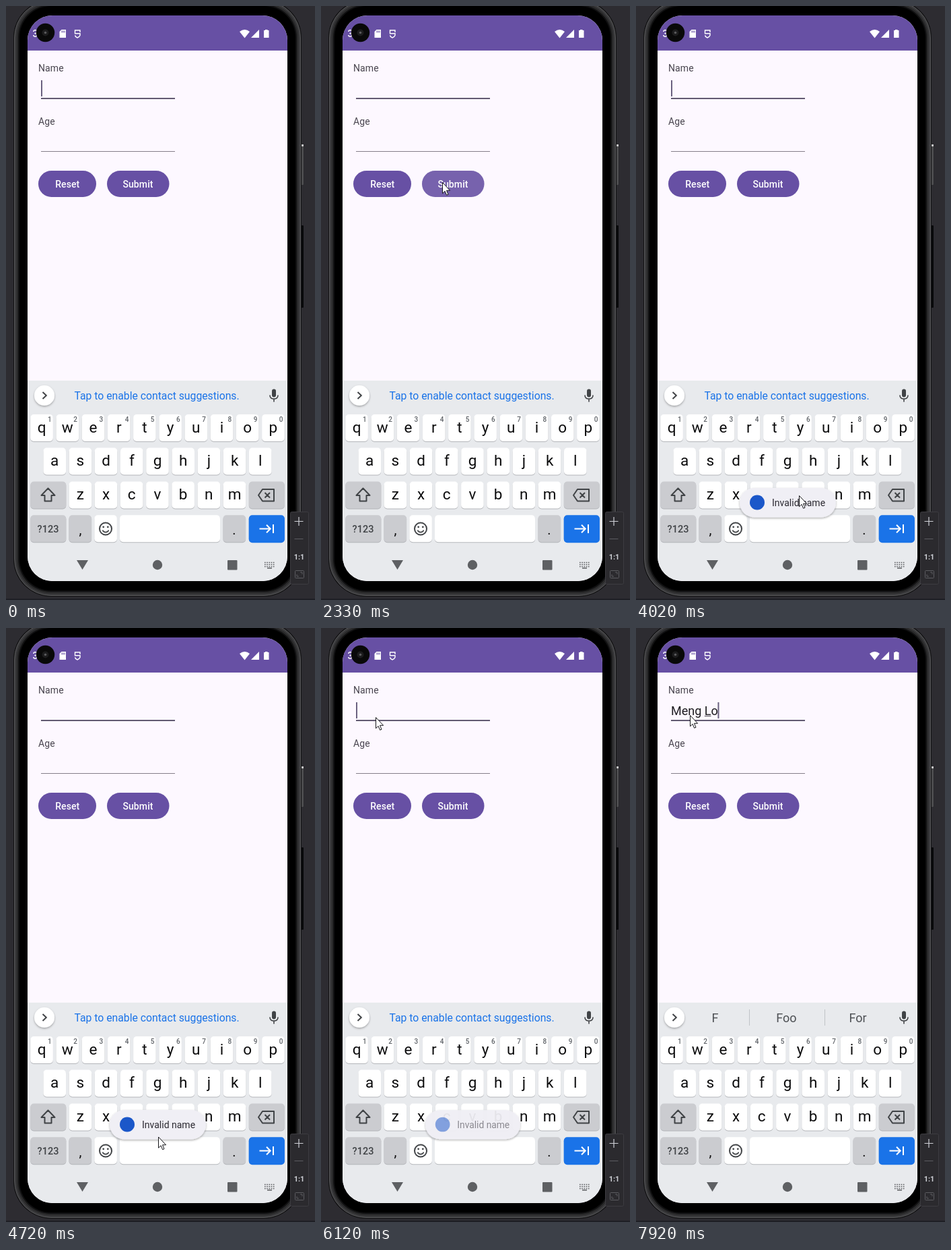
Write an HTML page that moves like this. It is 459 px wide and 880 px high and loops after 8000 ms.

```html
<!DOCTYPE html>
<html lang="en">
<head>
<meta charset="utf-8">
<title>Form demo</title>
<style>
  html, body { margin: 0; width: 100%; height: 100%; overflow: hidden; background: #2d2c31; }
  svg { display: block; width: 100%; height: 100%; }
  text { font-family: Roboto, sans-serif; white-space: pre; }
  .label { font-size: 14px; letter-spacing: .1px; fill: #49454f; }
  .action { font-size: 14px; font-weight: 500; letter-spacing: .1px; fill: #fff; text-anchor: middle; }
  .letter { font-size: 22.5px; fill: #0c0c0d; text-anchor: middle; }
  .hint { font-size: 10px; font-weight: 500; fill: #5f6368; text-anchor: middle; }
  .word { font-size: 18px; fill: #4d5054; text-anchor: middle; }
  .line { fill: none; stroke: #404346; stroke-width: 2; }
</style>
</head>
<body>
<svg viewBox="0 0 459 880" preserveAspectRatio="none">
  <defs>
    <clipPath id="screen"><rect x="32" y="14" width="386" height="838" rx="37"/></clipPath>
    <clipPath id="submitShape"><rect x="150" y="244" width="92.5" height="39" rx="19.5"/></clipPath>
    <filter id="soft" x="-20%" y="-30%" width="140%" height="170%">
      <feDropShadow dx="0" dy="1.5" stdDeviation="1.6" flood-opacity=".32"/>
    </filter>
  </defs>

  <!-- phone body -->
  <rect width="459" height="880" fill="#2d2c31"/>
  <rect y="878" width="459" height="2" fill="#1e1f25"/>
  <rect x="438" y="205" width="4" height="60" rx="1" fill="#4c4c4e"/>
  <rect x="439" y="205" width="3" height="3" fill="#c8c8c8"/>
  <rect x="438" y="325" width="4" height="122" rx="1" fill="#08080a"/>
  <rect x="11" y="-9" width="428" height="884" rx="56" fill="#0e0e0f"/>
  <rect x="12.5" y="-7.500" width="425" height="881" rx="54.500" fill="#3a3a3c" stroke="#59595b"/>
  <rect x="15.500" y="-4.500" width="419" height="875" rx="51.500" fill="#2a2a2b"/>
  <rect x="18" y="-2" width="414" height="870" rx="49" fill="#111112"/>
  <rect x="20" y="0" width="410" height="866" rx="47" fill="#000"/>

  <g clip-path="url(#screen)">
    <rect x="32" y="14" width="386" height="838" fill="#fdf8ff"/>
    <rect x="32" y="14" width="386" height="52" fill="#6750a4"/>
    <rect x="32" y="555" width="386" height="297" fill="#e8eaed"/>
  </g>

  <!-- status bar -->
  <g fill="#fff">
    <text x="39.5" y="46" font-size="14" font-weight="500">3</text>
    <path d="M82.5 35H89V47H79.5V38Z"/>
    <path d="M347 38Q354.5 32 362 38L354.5 47.500Z"/>
    <path d="M376 35V47H364Z"/>
    <path d="M385 36V35H388.500V36H390.500V47H383V36Z"/>
  </g>
  <path d="M83 36.500V39.500M85 36.500V39.500M87 36.500V39.500" stroke="#6750a4"/>
  <path d="M110 39V36H102.500V40.700H110V43.500Q109 46 106 47Q103 46 102.500 43.500" fill="none" stroke="#fff" stroke-width="1.400"/>
  <circle cx="58.500" cy="39.500" r="13.700" fill="#090909"/>
  <circle cx="58.500" cy="39.500" r="5" fill="#1c1c1d"/>
  <circle cx="58.500" cy="39.500" r="1.800" fill="#59595b"/>

  <!-- form -->
  <text class="label" x="48" y="97">Name</text>
  <text class="label" x="48" y="176">Age</text>
  <path d="M52 137H251" stroke="#625a72" stroke-width="2"/>
  <path d="M52 215.500H251" stroke="#857f8a"/>
  <rect x="48" y="244" width="86" height="39" rx="19.500" fill="#6750a4"/>
  <rect x="150" y="244" width="92.500" height="39" rx="19.500" fill="#6750a4"/>
  <circle id="ripple" cx="181" cy="262" fill="#fff" clip-path="url(#submitShape)"/>
  <text class="action" x="91.300" y="269">Reset</text>
  <text class="action" x="196" y="269">Submit</text>
  <text id="typed" x="52" y="129" font-size="18" fill="#1d1b20"></text>
  <path id="underline" stroke="#4a4650"/>
  <rect id="caret" y="110" width="2" height="24" fill="#6b6280"/>

  <!-- suggestion strip -->
  <circle cx="57" cy="577" r="15" fill="#fff" filter="url(#soft)"/>
  <path class="line" d="M54.500 572L59.800 577L54.500 582"/>
  <text id="tip" x="101.500" y="583" font-size="15.750" fill="#1a73e8">Tap to enable contact suggestions.</text>
  <g id="words">
    <text class="word" x="117.500" y="584">F</text>
    <text class="word" x="223.500" y="584">Foo</text>
    <text class="word" x="329.500" y="584">For</text>
    <path d="M168.500 565V589M280.500 565V589" stroke="#c0c3c7"/>
  </g>
  <rect x="395" y="567.500" width="6" height="12" rx="3" fill="#404346"/>
  <path class="line" style="stroke-width:1.600" d="M392 576.500Q392 582 398 582T404 576.500M398 582V586.500"/>

  <g id="keys"></g>

  <!-- key icons -->
  <path class="line" d="M62.500 714.500L52.500 725H57.500V733.500H67.500V725H72.500Z" stroke-linejoin="round"/>
  <path class="line" d="M381 716H398V733.500H381L375 724.800ZM384.500 721L392 728.500M392 721L384.500 728.500" stroke-linejoin="round"/>
  <text x="62.500" y="780" font-size="14.500" font-weight="500" fill="#404346" text-anchor="middle">?123</text>
  <text class="letter" x="110.500" y="783" style="font-size:20px">,</text>
  <text class="letter" x="339" y="783" style="font-size:20px">.</text>
  <circle class="line" cx="148" cy="774.500" r="9"/>
  <circle cx="144.700" cy="771.800" r="1.400" fill="#404346"/>
  <circle cx="151.300" cy="771.800" r="1.400" fill="#404346"/>
  <path class="line" style="stroke-width:1.700" d="M143.500 776.500Q144.800 779.700 148 779.700T152.500 776.500"/>
  <path d="M376.500 774.500H392M387 768.800L392.700 774.500L387 780.200M397 768V781" fill="none" stroke="#fff" stroke-width="2"/>

  <!-- navigation bar -->
  <g fill="#5e6063">
    <path d="M105 821H122L113.500 835Z"/>
    <circle cx="225" cy="828" r="7.200"/>
    <rect x="329" y="821" width="14.500" height="14.500" rx="1"/>
    <path d="M388 832H395V833.500H388Z"/>
  </g>
  <path d="M384 824.500H399M384 827.500H399M384 830.500H399" stroke="#5e6063" stroke-width="1.500" stroke-dasharray="1.700 1.500"/>

  <!-- zoom panel -->
  <rect x="422.500" y="749.500" width="27" height="107" rx="2" fill="#2b2a2e" stroke="#3d3c41"/>
  <path d="M428.500 763.500H441.500M435 757V770" stroke="#ced0d6" stroke-width="1.200"/>
  <path d="M428.500 789.500H441.500" stroke="#5c5c61"/>
  <text x="435.500" y="820" font-size="11" font-weight="700" fill="#ced0d6" text-anchor="middle">1:1</text>
  <rect x="429.500" y="836.500" width="13" height="11" rx="1" fill="none" stroke="#5c5c61"/>
  <path d="M432 842V845H435M437 839H440V842" fill="none" stroke="#5c5c61"/>

  <g id="toast">
    <rect id="toastBack" x="154" y="714" width="143" height="43.500" rx="21.750" fill="#f0eff5" filter="url(#soft)"/>
    <g id="toastContent">
      <circle cx="180" cy="735.500" r="11" fill="#1b57c9"/>
      <text x="202" y="741" font-size="14" fill="#2b2931">Invalid name</text>
    </g>
  </g>

  <path id="pointer" d="M.5 .5V16.700L4.100 13.300L6.600 19.200L9 18.200L6.500 12.300H11.600Z" fill="#fff" stroke="#16161a"/>
</svg>

<script>
const LOOP = 8000, STEP = 69;
const $ = id => document.getElementById(id);
const [typed, underline, caret, ripple, tip, words, toast, toastBack, toastContent, pointer] =
  ['typed', 'underline', 'caret', 'ripple', 'tip', 'words', 'toast', 'toastBack', 'toastContent', 'pointer'].map($);

function add(tag, attrs, text = '') {
  const el = document.createElementNS('http://www.w3.org/2000/svg', tag);
  for (const name in attrs) el.setAttribute(name, attrs[name]);
  el.textContent = text;
  return $('keys').appendChild(el);
}

function key(x, y, width, fill = '#fff', shadow = '#b4b6ba') {
  const box = { x, width, height: 40, rx: 5 };
  add('rect', { ...box, y: y + 1, fill: shadow });
  add('rect', { ...box, y, fill });
}

const PITCH = 38.2, KEY = 33.6, GREY = '#cbccd0', BLUE = '#1a73e8';
const letters = [];
[['qwertyuiop', 36.3, 605], ['asdfghjkl', 55.4, 654.5], ['zxcvbnm', 93.5, 704.5]].forEach(([row, left, y]) => {
  [...row].forEach((char, i) => {
    const x = left + i * PITCH;
    key(x, y, KEY);
    letters.push(add('text', { class: 'letter', x: x + KEY / 2, y: y + 26.5 }, char));
    if (y === 605) add('text', { class: 'hint', x: x + 28.6, y: 615.5 }, (i + 1) % 10);
  });
});
[[36.3, 704.5, 53, GREY], [360.8, 704.5, 53, GREY], [36.3, 754.3, 53, GREY], [93.5, 754.3, KEY, GREY],
 [131.3, 754.3, KEY], [169, 754.3, 149], [322.5, 754.3, KEY, GREY], [360.8, 754.3, 53, BLUE, BLUE]]
  .forEach(args => key(...args));

// time, x, y of the pointer tip
const pointerPath = [
  [760, 324, 701], [830, 312, 650], [970, 250, 500], [1110, 170, 360], [1310, 107, 285],
  [1510, 107, 285], [1650, 145, 275], [1790, 180, 261], [3260, 180, 261],
  [3400, 195, 330], [3600, 240, 560], [3800, 257, 710], [3900, 250, 727], [4020, 242, 725],
  [4200, 205, 745], [4400, 215, 765], [4600, 242, 755], [4760, 210, 752], [4860, 242, 748],
  [4930, 253, 743], [5070, 225, 640], [5220, 170, 460], [5360, 126, 325],
  [5500, 100, 220], [5640, 84, 145], [5770, 81, 132], [6720, 81, 132], [6721, 80, 129], [8000, 80, 129]
];
// time, text, start and end of the underlined part
const typing = [
  [0, '', 0, 0], [6780, 'M', 0, 1], [7060, 'Me', 0, 2], [7120, 'Men', 0, 3], [7190, 'Meng', 0, 4],
  [7250, 'Meng ', 0, 0], [7460, 'Meng L', 5, 6], [7920, 'Meng Lo', 5, 6]
];
const caretToggles = [230, 760, 1260, 1790, 2260, 2730, 3260, 3750, 4250, 4760, 5260, 5770, 6470, 6720];

const lastBefore = (table, t) => table.findLastIndex(row => row[0] <= t);
const ramp = (t, from, to) => Math.max(0, Math.min(1, (t - from) / (to - from)));
const show = (el, on) => el.style.display = on ? '' : 'none';

// moves between points in discrete steps, as the screen refreshes
function pointerAt(t) {
  const i = lastBefore(pointerPath, t);
  const [t0, x0, y0] = pointerPath[i];
  const [t1, x1, y1] = pointerPath[i + 1];
  const n = Math.max(1, Math.round((t1 - t0) / STEP));
  const p = Math.floor((t - t0) / (t1 - t0) * n) / n;
  return [x0 + (x1 - x0) * p, y0 + (y1 - y0) * p];
}

function render(t) {
  show(pointer, t >= 760);
  if (t >= 760) pointer.setAttribute('transform', `translate(${pointerAt(t)})`);

  const [, text, from, to] = typing[lastBefore(typing, t)];
  typed.textContent = text;
  const edge = n => 52 + (n ? typed.getSubStringLength(0, n) : 0);
  underline.setAttribute('d', to ? `M${edge(from)} 130.5H${edge(to)}` : '');
  caret.setAttribute('x', text ? edge(text.length) - .3 : 52);
  show(caret, caretToggles.filter(time => time <= t).length % 2 === 0);

  const caps = t >= 6720 && t < 6850;
  for (const el of letters) el.style.textTransform = caps ? 'uppercase' : 'none';
  show(tip, t < 7460);
  show(words, t >= 7460);

  const press = t < 1990 ? 0 : ramp(t, 1930, 2330);
  ripple.setAttribute('r', 75 * press);
  ripple.setAttribute('opacity', .1 * (1 - ramp(t, 2700, 2860)));

  // the content fades ahead of its background
  const fadeIn = ramp(t, 2670, 2860), fadeOut = ramp(t, 5980, 6270);
  const opacity = fadeIn * (1 - fadeOut);
  const scale = 1 - .03 * Math.max(1 - fadeIn, fadeOut);
  show(toast, t >= 2730 && opacity > 0);
  toastContent.setAttribute('opacity', opacity);
  toastBack.setAttribute('opacity', 1 - (1 - opacity) ** 4);
  toast.setAttribute('transform', `translate(225.5 736) scale(${scale}) translate(-225.5 -736)`);
}

const start = performance.now();
function tick(now) {
  render(Math.max(0, now - start) % LOOP);
  requestAnimationFrame(tick);
}
render(0);
requestAnimationFrame(tick);
</script>
</body>
</html>
```
